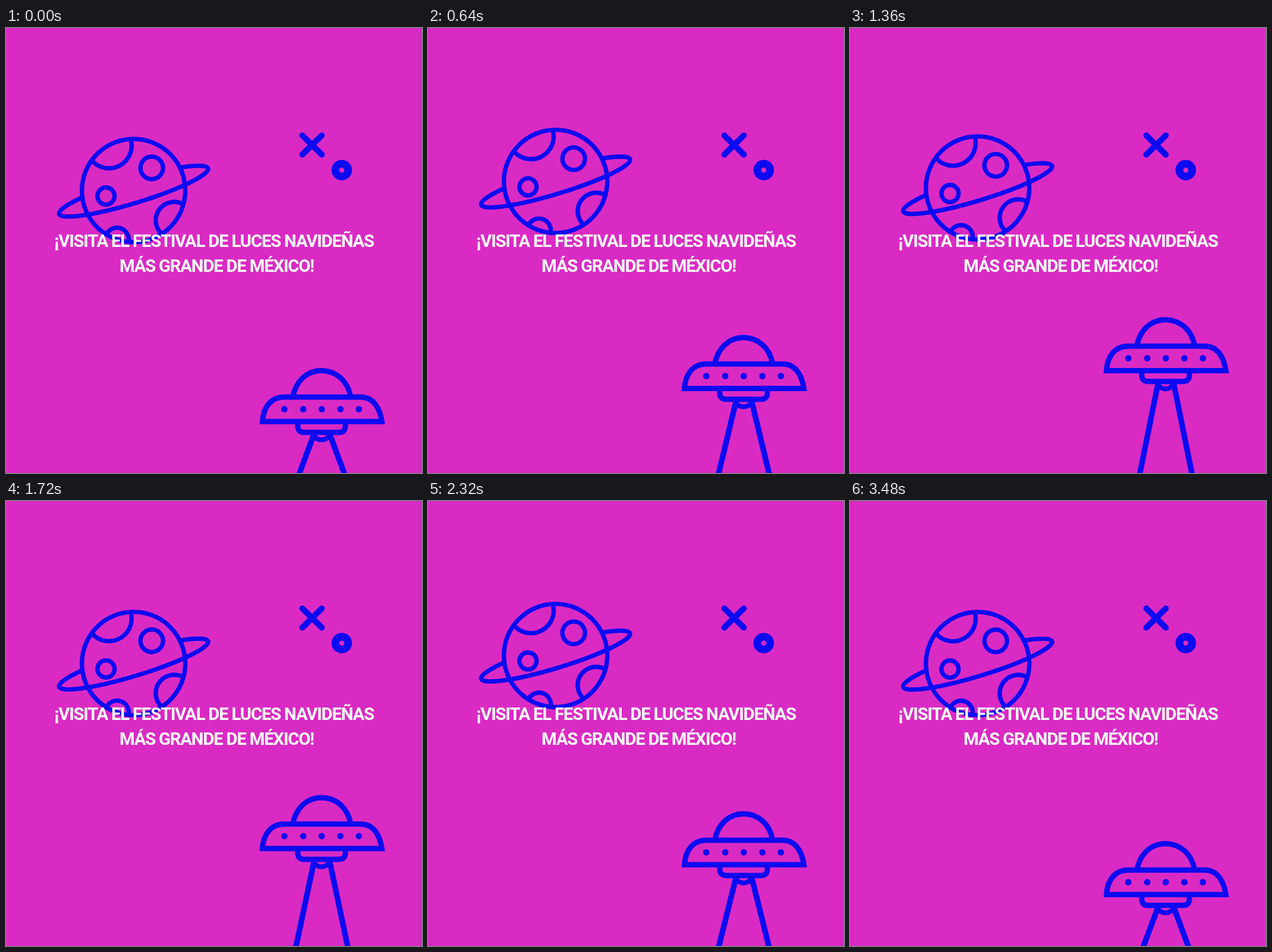
Write an HTML page that moves like this. It is 700 px wide and 750 px high and loops after 3520 ms.

```html
<!DOCTYPE html>
<html lang="es">
<head>
<meta charset="utf-8">
<style>
  html, body { margin: 0; width: 100%; height: 100%; overflow: hidden; background: #da2ac4; }
  svg { display: block; width: 700px; height: 750px; }
  .line { fill: none; stroke: #0a0af0; }
  .dots { fill: #0a0af0; }
  text {
    fill: #fff; text-anchor: middle;
    font: 700 37.5px "Open Sans", sans-serif;
    font-stretch: 62.5%; font-variation-settings: "wdth" 62.5;
  }
</style>
</head>
<body>
<svg viewBox="0 0 700 750">
  <rect width="700" height="750" fill="#da2ac4"/>
  <g class="line">
    <path d="M498.6 181L531.4 213.4M531.4 181L498.6 213.4" stroke-width="10" stroke-linecap="round"/>
    <circle cx="565" cy="239.5" r="10.8" stroke-width="13"/>
  </g>

  <g id="planet" class="line" stroke-width="7.4">
    <circle cx="214.7" cy="274" r="87"/>
    <circle cx="245.2" cy="235.7" r="19"/>
    <circle cx="168.3" cy="283.2" r="14.4"/>
    <path d="M145.8 224.8A38.2 38.2 0 0 0 210 187.8"/>
    <path d="M298 297A31 31 0 0 0 261 346"/>
    <path d="M169 348A19.7 19.7 0 0 1 206 361"/>
    <path transform="translate(214.7 275) rotate(-17)" d="M-84 -15.35A131 20 0 1 0 86 -15.1"/>
  </g>

  <path id="legs" class="line" stroke-width="9.5"/>
  <g id="ufo">
    <g class="line" stroke-width="9">
      <path d="M482.5 622C488 594 507 577.5 531 577.5S575 594 580 622"/>
      <path d="M431.5 663.3C433 640 445 622 468 622H597C618 622 629 640 632.5 663.3Z"/>
      <path d="M491 665V671Q491 681.5 502 681.5H560Q571 681.5 571 671V665"/>
      <path d="M516.5 684Q521 694 531 694T545.5 684" stroke-width="8"/>
    </g>
    <g id="lamps" class="dots"></g>
  </g>

  <text x="350" y="358.5">¡VISITA EL FESTIVAL DE LUCES NAVIDEÑAS</text>
  <text x="354.5" y="400.2">MÁS GRANDE DE MÉXICO!</text>
</svg>
<script>
const $ = id => document.getElementById(id);
const LOOP = 3520, STEP = 40, SPAN = 3480;

$('lamps').innerHTML = [468.3, 500.2, 531.3, 562.7, 593.8]
  .map(x => `<circle cx="${x}" cy="642.4" r="5.4"/>`).join('');

// Choose the face closest to the headline width, then size it to fit.
function setHeadline(width, size) {
  const lines = [...document.querySelectorAll('text')];
  const measure = () => lines[0].getComputedTextLength();
  const style = (name, value) => lines.forEach(l => l.style[name] = value);
  const use = face => style('fontFamily', `"${face}", sans-serif`);
  const miss = face => { use(face); return Math.abs(measure() - width); };
  const faces = ['Noto Sans', 'Open Sans', 'Roboto', 'Lato', 'Noto Sans CJK SC', 'DejaVu Sans Condensed'];
  const misses = faces.map(miss);
  use(faces[misses.indexOf(Math.min(...misses))]);
  const gap = Math.max(-1.6, Math.min(1.5, (width - measure()) / lines[0].textContent.length));
  style('letterSpacing', gap / size + 'em');
  const fit = size * Math.min(1, width / measure());
  style('fontSize', fit + 'px');
  // Keep the capitals centred on each line's y.
  lines.forEach(l => l.setAttribute('dy', 0.357 * fit));
}

// The planet bobs between rest and lift with a sine ease.
const turns = [0, 780, 1660, 2580, 3480], LIFT = -16.7;
function planetY(t) {
  let i = 0;
  while (i < 3 && t >= turns[i + 1]) i++;
  const x = (t - turns[i]) / (turns[i + 1] - turns[i]);
  const e = (1 - Math.cos(Math.PI * x)) / 2;
  return LIFT * (i % 2 ? 1 - e : e);
}

// The saucer drifts along a closed smooth curve.
const drift = [[0, 0], [320, -26], [1000, -82], [1720, -77.6], [2320, -50.3], [2920, 7.2]];
function key(i) {
  const n = drift.length, lap = Math.floor(i / n), [t, y] = drift[i - lap * n];
  return [t + lap * SPAN, y];
}
function slope(i) {
  const [a, ya] = key(i - 1), [b, yb] = key(i), [c, yc] = key(i + 1);
  return ((yb - ya) / (b - a) * (c - b) + (yc - yb) / (c - b) * (b - a)) / (c - a);
}
function ufoY(t) {
  let i = 0;
  while (i < drift.length - 1 && t >= key(i + 1)[0]) i++;
  const [a, ya] = key(i), [b, yb] = key(i + 1), h = b - a, u = (t - a) / h, v = 1 - u;
  return ya * (1 + 2 * u) * v * v + yb * (3 - 2 * u) * u * u
    + h * u * v * (slope(i) * v - slope(i + 1) * u);
}

function draw(time) {
  const t = Math.floor(time % LOOP / STEP) * STEP;
  const y = ufoY(t), top = 684 + y;
  $('planet').setAttribute('transform', `translate(0 ${planetY(t)})`);
  $('ufo').setAttribute('transform', `translate(0 ${y})`);
  $('legs').setAttribute('d', `M518.5 ${top}L480.6 786M544.5 ${top}L582.4 786`);
}

setHeadline(538, 37.5);
const start = performance.now();
function tick() {
  draw(performance.now() - start);
  requestAnimationFrame(tick);
}
tick();
</script>
</body>
</html>
```
